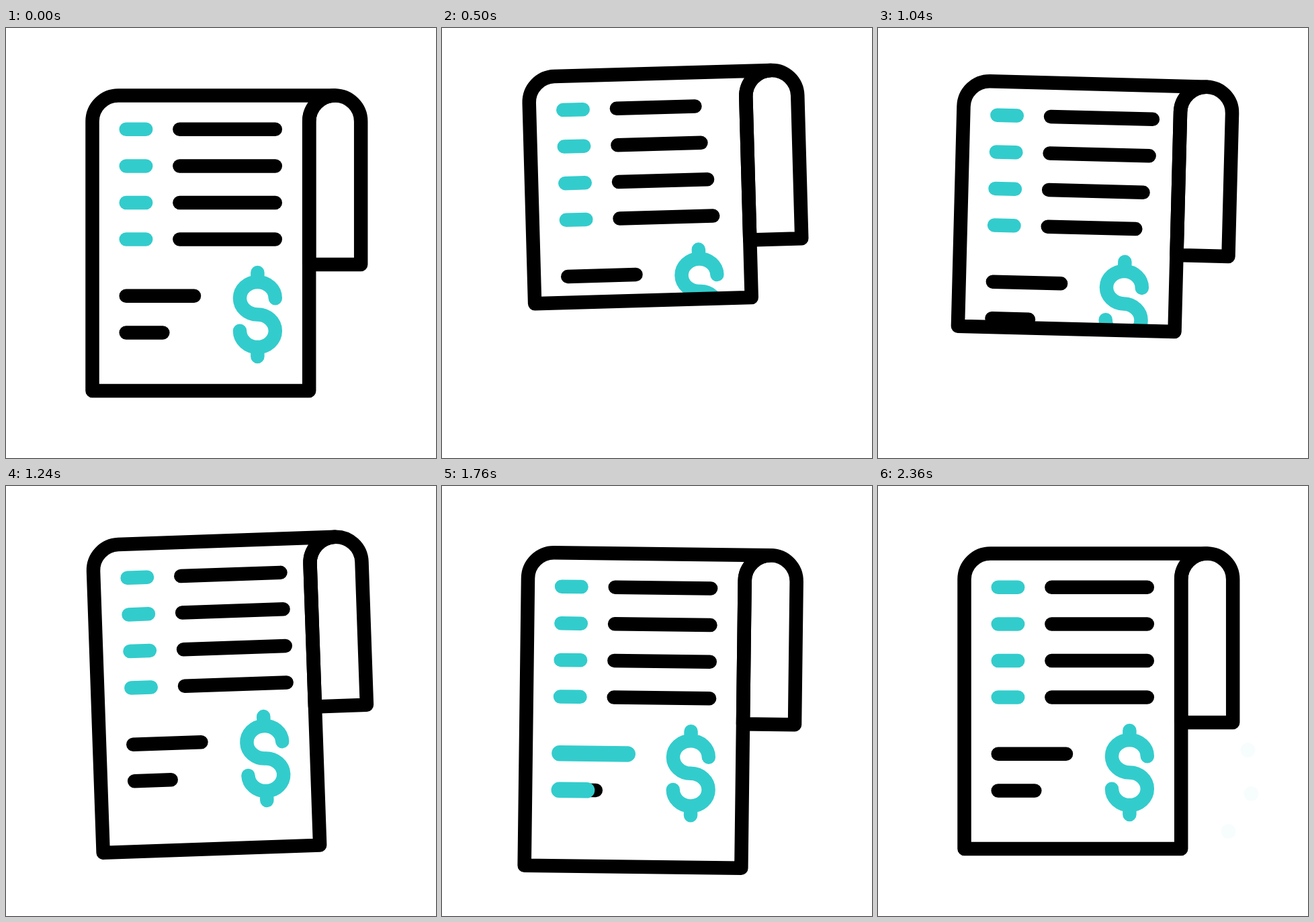
Write an HTML page with a canvas that moves like this. It is 640x640 px and loops after 2460 ms.

```html
<!DOCTYPE html>
<html lang="en">
<head>
<meta charset="utf-8">
<title>Receipt</title>
<style>
  html, body { margin: 0; width: 100%; height: 100%; overflow: hidden; background: #fff; }
  canvas { display: block; width: 100vw; height: 100vh; }
</style>
</head>
<body>
<canvas id="stage" width="640" height="640"></canvas>
<script>
const ctx = document.getElementById('stage').getContext('2d');
const LOOP = 2460, STEP = 20, REST = 2360;
const BLACK = '#000', TEAL = '#33cccc', WHITE = '#fff';
const LINE = 20.5;
const PIVOT = { x: 290, y: 98 };
const COIN = { x: 374.4, y: 426.5 };

// Keys are [time, value] pairs joined by sine easing.
function track(keys) {
  return t => {
    if (t <= keys[0][0]) return keys[0][1];
    for (let i = 1; i < keys.length; i++) {
      const [t0, v0] = keys[i - 1], [t1, v1] = keys[i];
      if (t < t1) return v0 + (v1 - v0) * (1 - Math.cos(Math.PI * (t - t0) / (t1 - t0))) / 2;
    }
    return keys[keys.length - 1][1];
  };
}

const lift = track([[205, 0], [500, -31.9], [820, 30.7], [1140, -32], [1460, 31.8], [1780, 0]]);
const tilt = track([[285, 0], [580, -0.034], [900, 0.066], [1225, -0.0355], [1535, 0.0716], [1845, 0]]);
const bottom = track([[242, 540], [720, 358], [1370, 579.5], [1550, 579.5], [2090, 540]]);
const shrink = track([[205, 0], [620, 32], [1060, -9.7], [1480, 0]]);
const coinTilt = track([[1180, 0], [1470, -0.063], [1850, 0]]);

const lowerBars = [
  { y: 398.8, end: 280, head: track([[1350, 0], [1670, 1]]), tail: track([[1880, 0], [2200, 1]]) },
  { y: 453.4, end: 233.3, head: track([[1545, 0], [1865, 1]]), tail: track([[1980, 0], [2300, 1]]) }
];

function bar(x0, x1, y, color, width = LINE) {
  ctx.strokeStyle = color;
  ctx.lineWidth = width;
  ctx.beginPath();
  ctx.moveTo(x0, y);
  ctx.lineTo(x1, y);
  ctx.stroke();
}

function dollar(t) {
  ctx.save();
  ctx.translate(COIN.x, COIN.y);
  ctx.rotate(coinTilt(t));
  ctx.strokeStyle = TEAL;
  ctx.lineWidth = LINE;
  ctx.beginPath();
  ctx.ellipse(0, -24.3, 26.4, 24.3, 0, 0, Math.PI / 2, true);
  ctx.ellipse(0, 24.3, 26.4, 24.3, 0, -Math.PI / 2, Math.PI);
  for (const s of [-1, 1]) {
    ctx.moveTo(0, s * 62.5);
    ctx.lineTo(0, s * 48.6);
  }
  ctx.stroke();
  ctx.restore();
}

// Dots fly out from behind the paper and fade.
function dots(t) {
  if (t < 1860) return;
  const p = (t - 1860) / (REST - 1860);
  const reach = 1 - (1 - p) ** 2;
  ctx.fillStyle = TEAL;
  ctx.globalAlpha = 0.04 + 0.96 * (1 - p ** 2);
  for (const [dx, dy] of [[176, -33.5], [181, 31.5], [147, 87.5]]) {
    ctx.beginPath();
    ctx.arc(COIN.x + reach * dx, COIN.y + reach * dy, 11, 0, 2 * Math.PI);
    ctx.fill();
  }
  ctx.globalAlpha = 1;
}

function fold() {
  ctx.beginPath();
  ctx.moveTo(451.2, 352);
  ctx.lineTo(451.2, 139);
  ctx.arc(489.7, 139, 38.5, Math.PI, 0);
  ctx.lineTo(528.2, 352);
  ctx.closePath();
}

function sheet(low) {
  ctx.beginPath();
  ctx.moveTo(489.7, 100.5);
  ctx.lineTo(167, 100.5);
  ctx.arc(167, 139, 38.5, -Math.PI / 2, Math.PI, true);
  ctx.lineTo(128.5, low);
  ctx.lineTo(451.2, low);
  ctx.lineTo(451.2, 139);
  ctx.arc(489.7, 139, 38.5, Math.PI, 1.5 * Math.PI);
}

function content(t) {
  for (let i = 0; i < 4; i++) {
    const y = 150.8 + i * 54.6;
    bar(178.7, 208.2, y, TEAL);
    bar(258.4, 400.8 - shrink(t - 68 * i), y, BLACK);
  }
  for (const b of lowerBars) {
    bar(178.7, b.end, b.y, BLACK);
    const head = b.head(t), tail = b.tail(t), len = b.end - 178.7;
    if (head > 0 && tail < 1) bar(178.7 + len * tail, 178.7 + len * head, b.y, TEAL, 23.5);
  }
  dollar(t);
}

function draw(t) {
  const low = bottom(t);
  ctx.fillStyle = WHITE;
  ctx.fillRect(0, 0, 640, 640);
  ctx.lineCap = ctx.lineJoin = 'round';
  dots(t);

  ctx.save();
  ctx.translate(PIVOT.x, PIVOT.y + lift(t));
  ctx.rotate(tilt(t));
  ctx.translate(-PIVOT.x, -PIVOT.y);

  ctx.fillStyle = WHITE;
  fold();
  ctx.fill();
  sheet(low);
  ctx.fill();

  ctx.save();
  ctx.beginPath();
  ctx.rect(128, 100, 323, low - 100);
  ctx.clip();
  content(t);
  ctx.restore();

  ctx.strokeStyle = BLACK;
  ctx.lineWidth = LINE;
  fold();
  ctx.stroke();
  sheet(low);
  ctx.stroke();
  ctx.restore();
}

const start = performance.now();
function tick() {
  const t = Math.max(0, performance.now() - start) % LOOP;
  draw(Math.min(Math.floor(t / STEP) * STEP, REST));
  requestAnimationFrame(tick);
}
tick();
</script>
</body>
</html>
```
